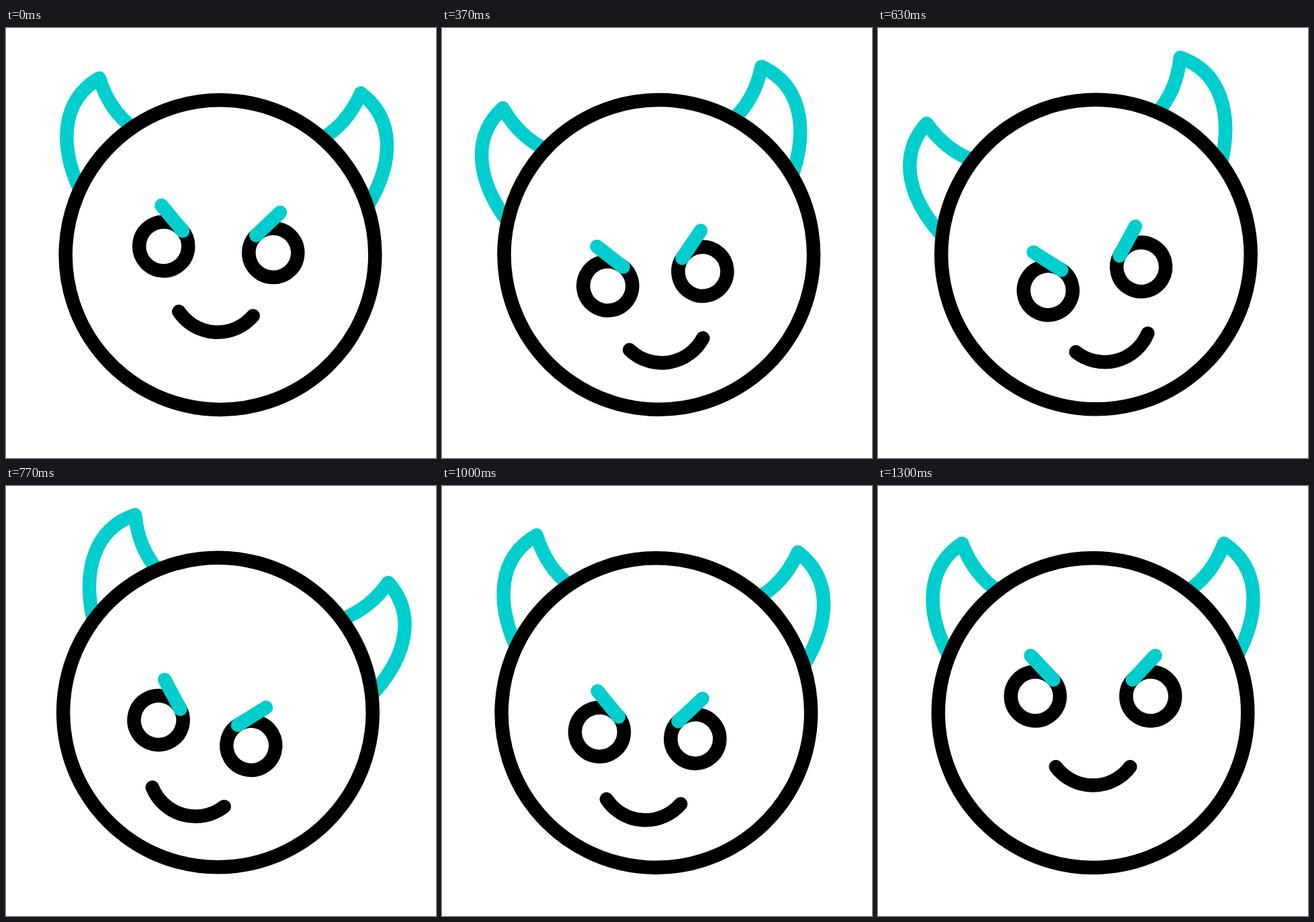
These frames come from a looping animation (640x640 px, 1.67 s). An HTML page:

```html
<!DOCTYPE html>
<html lang="en">
<head>
<meta charset="utf-8">
<title>Laughing imp</title>
<style>
  html, body { margin: 0; height: 100%; overflow: hidden; background: #fff; }
  svg { display: block; width: 100%; height: 100%; }
  g { fill: none; stroke: #000; stroke-width: 20.5; stroke-linecap: round; stroke-linejoin: round; }
  .teal { stroke: #00cece; }
</style>
</head>
<body>
<svg viewBox="0 0 640 640">
  <defs>
    <path id="horn" class="teal" d="M180 157Q143 133 125 85.5C70 122 72 188 104 250"/>
    <g id="eye">
      <circle cx="234.2" cy="313" r="36.5"/>
      <path class="teal" d="M227.4 252.4L261.2 288.6"/>
    </g>
  </defs>
  <g id="imp">
    <use href="#horn"/>
    <use href="#horn" transform="matrix(-1 0 0 1 640 0)"/>
    <circle cx="320" cy="337.6" r="230.3" fill="#fff"/>
    <g id="left"><use href="#eye"/></g>
    <g id="right"><use href="#eye" transform="matrix(-1 0 0 1 640 0)"/></g>
    <path id="mouth" d="M264.7 418A69.3 69.3 0 0 0 375.3 418"/>
  </g>
</svg>
<script>
const LOOP = 1670, FPS = 30;

// [time in ticks, value] pairs, eased between neighbours
const tilt = [[-1.7, 0], [8, 40.5], [12.05, -19], [15.9, 19], [19.84, -19],
              [23.8, 19], [27.76, -19], [31.72, 19], [38.9, 0]];
const eyesDown = [[-2.3, 0], [4.2, 1], [31.7, 1], [38.9, 0]];
const mouthDown = [[-1.9, 0], [6.1, 1], [31.7, 1], [38.9, 0]];

const byId = id => document.getElementById(id);
const smooth = p => p * p * (3 - 2 * p);

function valueAt(keys, tick) {
  const next = keys.findIndex(key => key[0] > tick);
  if (next < 0) return keys[keys.length - 1][1];
  const [t0, v0] = keys[next - 1], [t1, v1] = keys[next];
  return v0 + (v1 - v0) * smooth((tick - t0) / (t1 - t0));
}

function shift(id, x, y, amount) {
  byId(id).setAttribute('transform', `translate(${x * amount} ${y * amount})`);
}

function draw(now) {
  const tick = Math.floor(now % LOOP / 1000 * FPS + 0.11);
  const eyes = valueAt(eyesDown, tick);
  byId('imp').setAttribute('transform', `rotate(${valueAt(tilt, tick)} 320 320)`);
  shift('left', 3.4, 58.6, eyes);
  shift('right', -25.4, 59.6, eyes);
  shift('mouth', -10.2, 52.6, valueAt(mouthDown, tick));
}

const start = performance.now();
function loop() {
  draw(performance.now() - start);
  requestAnimationFrame(loop);
}
loop();
</script>
</body>
</html>
```
